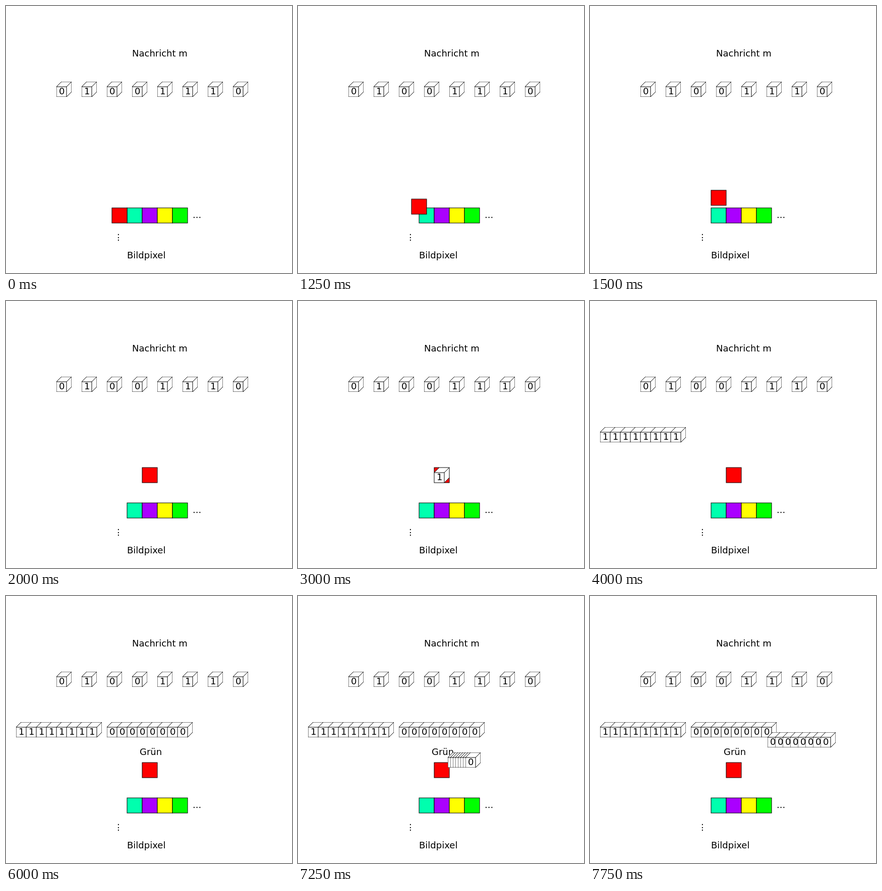
Recreate the animation shown at these times as an HTML page. Size 567 by 529 pixels, loop 8000 ms.

```html
<!DOCTYPE html>
<html lang="de">
<head>
<meta charset="utf-8">
<title>Nachricht und Bildpixel</title>
<style>
  html, body { margin: 0; width: 100%; height: 100%; overflow: hidden; background: #fff; }
  svg { display: block; }
  text { font: 18px "DejaVu Sans", sans-serif; }
  .px, #box path { stroke: #000; stroke-width: 1; }

  .lift, .left, .right, .late { animation: 8s step-end infinite; }
  .lift { animation-name: lift; }
  .late { animation-name: late; }
  .left { animation-name: left; }
  .right { animation-name: right; }

  @keyframes lift {
    0% { transform: translate(210px, 400px); }
    15.625% { transform: translate(225px, 382.5px); }
    18.75% { transform: translate(240px, 365px); }
    21.875% { transform: translate(255px, 347.5px); }
    25%, 100% { transform: translate(270px, 330px); }
  }
  @keyframes late {
    0% { opacity: 0; }
    75%, 100% { opacity: 1; }
  }
  /* --dx is the full way; quarter steps snap down to whole pixels */
  @keyframes left {
    0% { opacity: 0; transform: translate(270px, 330px); }
    37.5% { opacity: 1; transform: translate(270px, 330px); }
    40.625% { opacity: 1; transform: translate(calc(269.5px + var(--dx) * .25), 310px); }
    43.75% { opacity: 1; transform: translate(calc(270px + var(--dx) * .5), 290px); }
    46.875% { opacity: 1; transform: translate(calc(269.5px + var(--dx) * .75), 270px); }
    50%, 100% { opacity: 1; transform: translate(calc(270px + var(--dx)), 250px); }
  }
  @keyframes right {
    0% { opacity: 0; transform: translate(270px, 330px); }
    87.5% { opacity: 1; transform: translate(270px, 330px); }
    90.625% { opacity: 1; transform: translate(calc(269.5px + var(--dx) * .25), 310px); }
    93.75% { opacity: 1; transform: translate(calc(270px + var(--dx) * .5), 290px); }
    96.875%, 100% { opacity: 1; transform: translate(calc(269.5px + var(--dx) * .75), 270px); }
  }
</style>
</head>
<body>
<svg width="567" height="529" viewBox="0 0 567 529">
  <symbol id="box" viewBox="0 0 30 30" width="30" height="30">
    <path d="M0 10L10 0H30V20L20 30H0Z" fill="#fff"/>
    <path d="M0 10H20L30 0M20 10V30" fill="none"/>
  </symbol>

  <text x="250" y="100">Nachricht m</text>
  <g id="message"></g>

  <g class="px">
    <rect x="240" y="400" width="30" height="30" fill="#00ffae"/>
    <rect x="270" y="400" width="30" height="30" fill="#a0f"/>
    <rect x="300" y="400" width="30" height="30" fill="#ff0"/>
    <rect x="330" y="400" width="30" height="30" fill="#0f0"/>
  </g>
  <text x="370" y="420">...</text>
  <text><tspan x="220" y="454">.</tspan><tspan x="220" y="460">.</tspan><tspan x="220" y="465">.</tspan></text>
  <text x="240" y="500">Bildpixel</text>

  <rect class="px lift" width="30" height="30" fill="#f00"/>
  <g id="red"></g>
  <g id="green" class="late"><text x="265" y="315">Grün</text></g>
  <g id="blue"></g>
</svg>
<script>
  const cube = bit => `<use href="#box"/><text x="5" y="25">${bit}</text>`;

  const fill = (id, bits, attrs) => {
    const html = [...bits].map((bit, i) => `<g ${attrs(i)}>${cube(bit)}</g>`).join("");
    document.getElementById(id).insertAdjacentHTML("beforeend", html);
  };

  fill("message", "01001110", i => `transform="translate(${100 + 50 * i} 150)"`);
  fill("red", "11111111", i => `class="left" style="--dx:${20 * i - 250}px"`);
  fill("green", "00000000", i => `transform="translate(${200 + 20 * i} 250)"`);
  fill("blue", "00000000", i => `class="right" style="--dx:${20 * i + 110}px"`);
</script>
</body>
</html>
```
